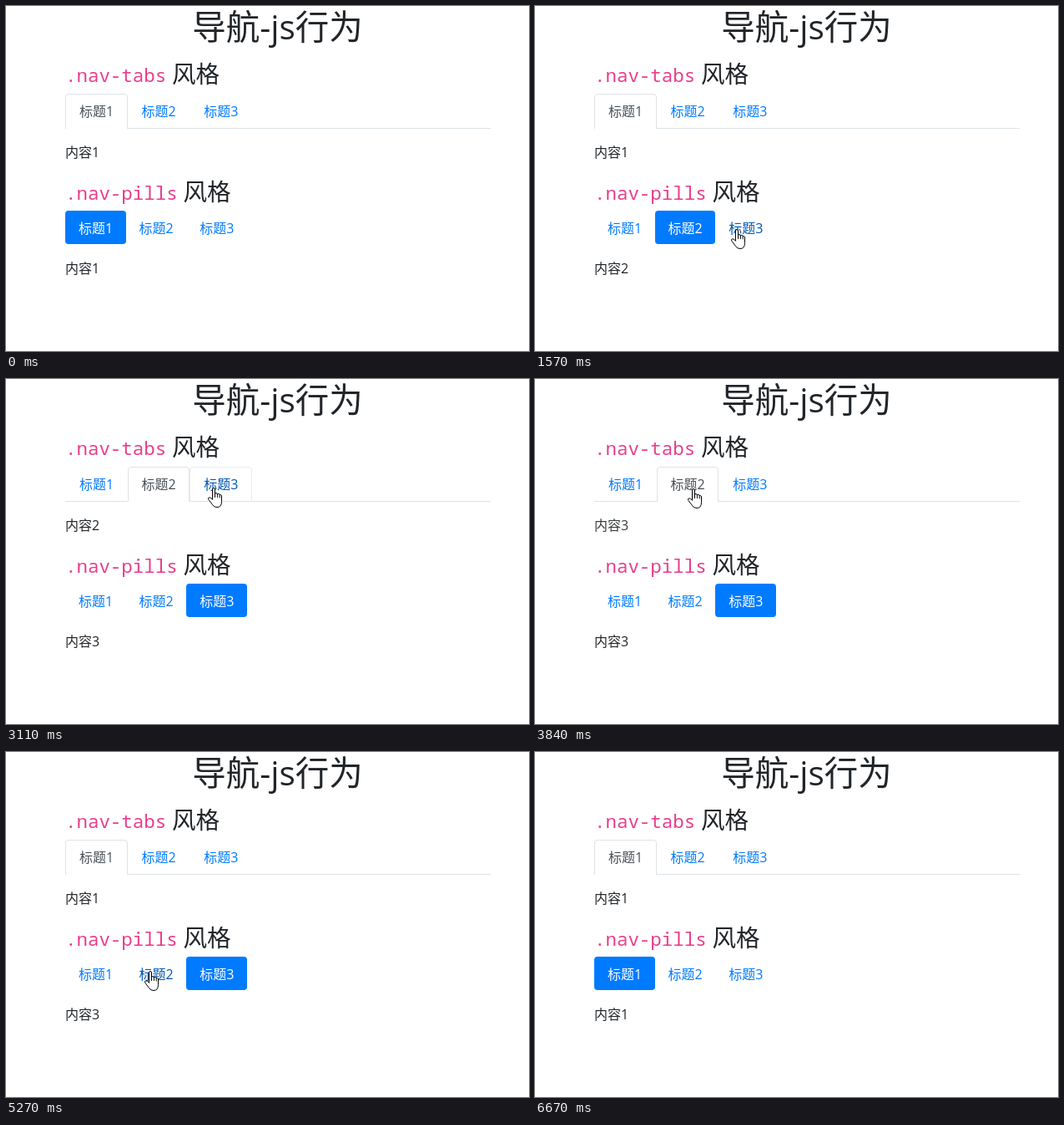
Animation, 627 px wide and 413 px high, one loop 7.07 s. Source, as an HTML page:

```html
<!DOCTYPE html>
<html lang="zh-CN">
<head>
<meta charset="utf-8">
<title>导航-js行为</title>
<style>
html, body { margin: 0; width: 100%; height: 100%; overflow: hidden; background: #fff; }
svg { display: block; width: 100%; height: 100%; }
text { font: 16px "Open Sans", "Noto Sans CJK SC", "Noto Sans CJK", sans-serif; fill: #212529; }
.title { font-size: 40.5px; text-anchor: middle; }
.head { font-size: 28.6px; }
.code { font: 500 22.45px "Noto Sans Mono", monospace; fill: #e83e8c; }
</style>
</head>
<body>
<svg viewBox="0 0 627 413">
  <text class="title" x="325.5" y="39.5">导航-js行为</text>
  <text class="code" x="71" y="91">.nav-tabs</text>
  <text class="head" x="199" y="92">风格</text>
  <rect x="71" y="146" width="510" height="1" fill="#dee2e6"/>
  <g id="tabs"></g>
  <text class="code" x="71" y="232">.nav-pills</text>
  <text class="head" x="212.5" y="233">风格</text>
  <g id="pills"></g>
  <g id="hand" fill="#fff" stroke="#000" stroke-linecap="round" stroke-linejoin="round">
    <path d="M5.5 13.5V2Q5.5 .5 7 .5T8.5 2V7.5Q8.7 6.5 10 6.6Q11.4 6.8 11.4 8Q11.6 7.2 12.8 7.3Q14.2 7.5 14.2 8.9Q14.5 8.2 15.5 8.4Q16.5 8.8 16.5 10V16.5Q16.5 23.5 11 23.5Q7.5 23.5 5.8 20.8L1 14.5Q-.2 12.6 1.3 11.8Q2.8 11.2 5.5 14Z"/>
    <path d="M8.5 7.5V11.5M11.4 8V11.5M14.2 9V12" fill="none"/>
  </g>
  <path id="arrow" d="M.5 .5V16.5L4.2 13L6.6 18.5L9 17.5L6.6 12H11.6Z" fill="#fff" stroke="#000"/>
</svg>
<script>
const LOOP = 7070;
const START = 280, TICK = 142, TICKS = 45;  // the screen refreshes once per tick
const LINK = '#007bff', HOVER = '#0056b3';
const ENTRY = { x: 257, y: 397 };

// Pointer moves, timed in ticks
const moves = [
  { from: 0, to: 4, x: 184, y: 264 },
  { from: 6, to: 9, x: 243, y: 268 },
  { from: 11, to: 16, x: 192, y: 127 },
  { from: 19, to: 20, x: 250, y: 131 },
  { from: 23, to: 25, x: 191, y: 132 },
  { from: 25, to: 27, x: 117, y: 132 },
  { from: 30, to: 35, x: 174, y: 263 },
  { from: 37, to: 39, x: 121, y: 263 },
  { from: 40, to: 44, x: 551, y: 401 }
];

const $ = id => document.getElementById(id);
const easeOut = k => 1 - (1 - k) ** 2;

function add(parent, tag, attrs, text = '') {
  const el = document.createElementNS('http://www.w3.org/2000/svg', tag);
  for (const k in attrs) el.setAttribute(k, attrs[k]);
  el.textContent = text;
  parent.append(el);
  return el;
}

function tabPath(x, r, top) {
  const y = top + .5;
  return `M${x + .5} ${top + 42}V${top + 4}Q${x + .5} ${y} ${x + 4} ${y}` +
    `H${r - 4}Q${r - .5} ${y} ${r - .5} ${top + 4}V${top + 42}`;
}

function makeNav(id, nav) {
  const g = $(id);
  const items = [0, 1, 2].map(i => {
    const left = 71 + i * nav.width;
    const x = Math.round(left), r = Math.round(left + nav.width);
    const shape = nav.tab
      ? add(g, 'path', { d: tabPath(x, r, nav.top) })
      : add(g, 'rect', { x, y: nav.top, width: r - x, height: nav.height, rx: 4, fill: LINK });
    const label = add(g, 'text', { x: left + nav.pad, y: nav.top + 27 }, '标题' + (i + 1));
    return { x, r, shape, label };
  });
  const content = add(g, 'text', { x: 71, y: nav.top + nav.height + (nav.tab ? 34 : 35) });
  return { ...nav, items, content };
}

const navs = [
  makeNav('tabs', { tab: true, top: 105, height: 42, width: 74.6, pad: 17,
    clicks: [{ at: 18, item: 1 }, { at: 22, item: 2 }, { at: 25, item: 1 }, { at: 29, item: 0 }] }),
  makeNav('pills', { tab: false, top: 245, height: 40, width: 72.6, pad: 16,
    clicks: [{ at: 5, item: 1 }, { at: 11, item: 2 }, { at: 36, item: 1 }, { at: 40, item: 0 }] })
];

function pointer(n) {
  let { x, y } = ENTRY;
  for (const m of moves) {
    if (n <= m.from) break;
    const k = easeOut(Math.min(1, (n - m.from) / (m.to - m.from)));
    x += (m.x - x) * k;
    y += (m.y - y) * k;
  }
  return { x: Math.round(x), y: Math.round(y) };
}

// The old pane fades out for one tick, then the new one fades in
function drawNav(nav, n, pos) {
  let active = 0, last = 0, age = 2;
  for (const { at, item } of nav.clicks) {
    if (at <= n) [last, active, age] = [active, item, n - at + .1];
  }
  const leaving = age < 1;
  nav.content.textContent = '内容' + ((leaving ? last : active) + 1);
  nav.content.style.opacity = leaving ? 1 - age : Math.min(1, age - 1);

  const inRow = pos && pos.y >= nav.top && pos.y < nav.top + nav.height;
  let over = false;
  nav.items.forEach(({ x, r, shape, label }, i) => {
    const on = i === active;
    const hover = inRow && pos.x >= x && pos.x < r;
    over ||= hover;
    if (nav.tab) {
      shape.style.fill = on ? '#fff' : 'none';
      shape.style.stroke = on ? '#dee2e6' : hover ? '#e9ecef' : 'none';
    } else {
      shape.style.display = on ? '' : 'none';
    }
    label.style.fill = on ? (nav.tab ? '#495057' : '#fff') : hover ? HOVER : LINK;
  });
  return over;
}

function place(el, show, x, y) {
  el.style.display = show ? '' : 'none';
  el.setAttribute('transform', `translate(${x} ${y})`);
}

function draw(t) {
  const n = t < START ? -1 : Math.floor((t - START) / TICK + .35);
  const pos = n >= 0 && n < TICKS ? pointer(n) : null;
  const over = navs.map(nav => drawNav(nav, n, pos)).some(Boolean);
  const { x, y } = pos || ENTRY;
  place($('hand'), pos && over, x - 8, y - 1);
  place($('arrow'), pos && !over, x, y);
}

function tick() {
  draw(performance.now() % LOOP);
  requestAnimationFrame(tick);
}
tick();
</script>
</body>
</html>
```
